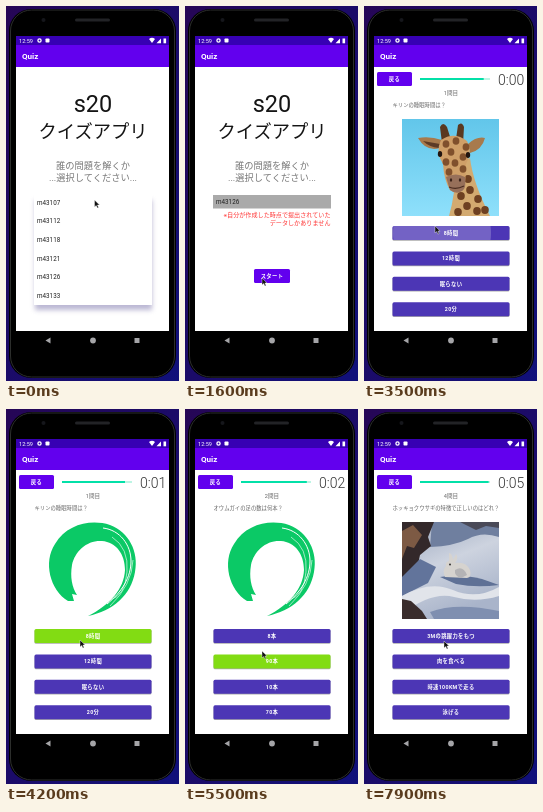
These frames come from a looping animation (173 px wide and 375 px high, 8000 ms). An HTML page:

```html
<!DOCTYPE html>
<html lang="ja">
<head>
<meta charset="utf-8">
<title>Quiz</title>
<style>
html, body { margin: 0; width: 100%; height: 100%; overflow: hidden; background: #140a50; }
svg { display: block; width: 100vw; height: 100vh; }
text { font-family: Roboto, "Noto Sans CJK JP", "Noto Sans CJK", sans-serif; }
.mid { text-anchor: middle; }
.btn { fill: #fff; font-size: 5.3px; font-weight: 700; letter-spacing: .35px; }
</style>
</head>
<body>
<svg id="stage" viewBox="0 0 173 375">
  <defs>
    <filter id="soft" x="-20%" y="-20%" width="140%" height="150%"><feGaussianBlur stdDeviation="2.5"/></filter>
    <clipPath id="screen"><rect x="10" y="61" width="153" height="264"/></clipPath>
    <clipPath id="photo"><rect x="38" y="113" width="97" height="97"/></clipPath>
    <linearGradient id="edge" x2="1" y2="1"><stop stop-color="#260656"/><stop offset="1" stop-color="#10107a"/></linearGradient>
    <linearGradient id="sky" x2="0" y2="1"><stop stop-color="#62c6ea"/><stop offset="1" stop-color="#8fe0fb"/></linearGradient>
    <radialGradient id="sea"><stop stop-color="#0c2860"/><stop offset="1" stop-color="#061336"/></radialGradient>
    <linearGradient id="snow" x2=".4" y2="1"><stop stop-color="#98a5bd"/><stop offset=".5" stop-color="#cdd3df"/><stop offset="1" stop-color="#a9b4ca"/></linearGradient>
  </defs>

  <rect width="173" height="375" fill="url(#edge)"/>
  <rect x="3" y="3" width="167" height="369" rx="22" fill="#000"/>
  <rect x="4.500" y="4" width="164" height="367" rx="21" fill="none" stroke="#2c2e2c"/>
  <rect x="69" y="12.5" width="35" height="3" rx="1.5" fill="#222326"/>
  <circle cx="37.500" cy="14" r="2" fill="#15161b"/>
  <rect x="10" y="30" width="153" height="9" fill="#3700b3"/>
  <rect x="10" y="39" width="153" height="22" fill="#6200ee"/>
  <g fill="#fff">
    <text x="13" y="36.5" font-size="5.6">12:59</text>
    <circle cx="33.5" cy="34.5" r="1.6" fill="none" stroke="#fff" stroke-width="1.3"/>
    <rect x="39.5" y="32.5" width="4" height="4" rx=".8"/>
    <path d="M143 33q3-2.500 6 0l-3 4zM150.500 37.300l4.500-4.800v4.800z"/>
    <rect x="157.500" y="32.500" width="2.600" height="4.800"/>
    <text x="16" y="53" font-size="8.100" font-weight="700">Quiz</text>
  </g>
  <rect x="10" y="61" width="153" height="264" fill="#fff"/>
  <g id="pages" clip-path="url(#screen)"></g>
  <g fill="#a5a5a8">
    <path d="M39.500 334.500l5-3v6z"/>
    <circle cx="87" cy="334.500" r="2.900"/>
    <rect x="128.500" y="332" width="5" height="5"/>
  </g>
  <path id="cursor" d="M0 0v7l1.700-1.500 1.200 2.600 1.200-.6-1.200-2.500h2.200z" fill="#111" stroke="#fff" stroke-width=".4"/>
</svg>
<script>
const LOOP = 8000, STEP = 100;
const $ = id => document.getElementById(id);
const show = (el, on) => el.style.display = on ? '' : 'none';
const clamp = v => Math.max(0, Math.min(1, v));

const label = (x, y, size, fill, s, extra = '') =>
  `<text x="${x}" y="${y}" font-size="${size}" fill="${fill}" ${extra}>${s}</text>`;
const box = (x, y, w, h, fill, extra = '') =>
  `<rect x="${x}" y="${y}" width="${w}" height="${h}" fill="${fill}" ${extra}/>`;
const shape = (d, fill) => `<path d="${d}" fill="${fill}"/>`;
const line = (d, color, w) => `<path d="${d}" fill="none" stroke="${color}" stroke-width="${w}"/>`;
const oval = (x, y, rx, ry, fill) => `<ellipse cx="${x}" cy="${y}" rx="${rx}" ry="${ry}" fill="${fill}"/>`;
const mid = 'class="mid"';

const users = ['m43107', 'm43112', 'm43118', 'm43121', 'm43126', 'm43133'];
const chosen = users[4];

const home = `<g id="home">
  ${label(87, 106, 23.500, '#151515', 's20', mid)}
  ${label(87, 132, 18.300, '#151515', 'クイズアプリ', mid)}
  ${label(87, 163, 9.250, '#777', '誰の問題を解くか', mid)}
  ${label(87, 175, 9.250, '#777', '...選択してください...', mid)}
  ${box(28, 189, 118, 13.500, '#aaa')}
  ${label(31, 198, 6.300, '#222', chosen)}
  ${label(145.500, 210.500, 6.100, '#f33', '※自分が作成した時点で提出されていた', 'text-anchor="end"')}
  ${label(145.500, 218.500, 6.100, '#f33', 'データしかありません', 'text-anchor="end"')}
  ${box(69, 263, 36, 14, '#6200ee', 'rx="1.500"')}
  ${label(87, 272, 5.300, '#fff', 'スタート', 'class="mid btn"')}
  <g id="popup">
    ${box(29, 194, 117, 110, '#7770a8', 'opacity=".5" filter="url(#soft)"')}
    ${box(28, 188, 118, 111, '#fff')}
    <rect id="picked" x="28" y="261" width="118" height="19" fill="#ddd"/>
    ${users.map((u, i) => label(31, 198.500 + i * 18.700, 6.300, '#222', u)).join('')}
  </g>
</g>`;

// Animal pictures, in flat shapes
const giraffe = () => {
  const spots = [[97, 190], [106, 184], [114, 193], [103, 200], [113, 205], [94, 206], [121, 204], [104, 173]];
  const marks = [[82, 138], [92, 135], [102, 141], [87, 146], [99, 151], [82, 156], [91, 157], [99, 163], [85, 166]];
  return box(38, 113, 97, 97, 'url(#sky)') +
    shape('M92 160L106 152Q109 177 126 210H85Q91 190 92 160z', '#d3aa70') +
    spots.map(([x, y]) => oval(x, y, 3.800, 4, '#6e4021')).join('') +
    shape('M76 142Q62 146 54 132Q66 130 78 134zM104 138Q113 130 121 132Q118 144 106 147z', '#a87a4c') +
    shape('M75 142Q65 141 59 135L76 138z', '#5d3b26') +
    shape('M78 137L76 121Q79 115 83 121L87 134zM92 133L94 119Q98 115 100 121L99 138z', '#5a3920') +
    shape('M77 134Q90 125 103 135Q109 146 102 158Q102 174 100 182Q94 190 86 184Q80 174 79 158Q71 146 77 134z', '#cf9f68') +
    marks.map(([x, y]) => oval(x, y, 3.400, 3.800, '#80502c')).join('') +
    shape('M82 171Q92 166 101 171Q102 180 100 183Q94 190 86 184z', '#97705a') +
    oval(76, 148, 2.200, 3, '#20140f') + oval(104, 149, 2.200, 3, '#20140f') +
    oval(87, 174, 1.200, 1.800, '#3d251c') + oval(96, 174, 1.200, 1.800, '#3d251c') +
    line('M85 181Q92 184 100 180', '#4a2c20', 1.200);
};

const nautilus = () => {
  let s = box(38, 113, 97, 97, 'url(#sea)');
  for (let i = 0; i < 11; i++) {
    const x = 28 + i * 11, y = 116 + i * 37 % 82;
    s += line(`M${x} ${y}q9 3 13 14t15 13`, i % 2 ? '#153a75' : '#040e29', 1.200);
  }
  s += shape('M73 158Q67 146 79 140Q93 135 103 145Q111 158 102 168Q91 176 80 169z', '#efe8db');
  for (let i = 0; i < 9; i++) {
    const a = -2.600 + i * .48, c = Math.cos(a), d = Math.sin(a);
    s += line(`M${90 + 6 * c} ${156 + 5 * d}Q${91 + 11 * c} ${152 + 11 * d} ${90 + 15 * c} ${155 + 15 * d}`, '#b8753f', 2);
  }
  s += oval(89, 157, 5, 4.500, '#e9dfcb') + oval(79, 160, 2.500, 2.500, '#3c3030');
  for (let i = 0; i < 7; i++)
    s += line(`M78 ${159 + i}Q72 ${158 + i * 2} ${66 + i * 2.200} ${160 + i * 2.500}`, '#e7d9c0', .9);
  return s;
};

const hare = () => box(38, 113, 97, 97, 'url(#snow)') +
  shape('M68 113H135V128Q118 122 104 130Q90 137 66 138z', '#6f7f9f') +
  shape('M96 113H135V119L122 117L112 121z', '#4a4a58') +
  shape('M38 113H70L64 128L67 137L56 146L53 160L44 168L38 170z', '#33282a') +
  shape('M38 122L49 116L58 126L50 139L43 137L38 150z', '#7d5a44') +
  shape('M38 168L56 150L72 158L64 174L38 187z', '#62749b') +
  shape('M38 187Q66 171 89 181T135 178V187Q112 194 90 188T38 205z', '#e1e4ea') +
  shape('M76 168Q95 164 118 170L135 176Q112 179 92 175z', '#5f7196') +
  shape('M38 190L47 192L58 202L63 210H38z', '#3a2d2c') +
  shape('M66 203Q92 193 135 202V210H70z', '#7f8fb0') +
  shape('M81 168Q78 161 82 157Q81 153 85 152L85 144Q88 144 89 151L92 145Q95 149 91 154Q102 152 106 161Q108 168 103 169z', '#d6d3cf') +
  shape('M91 161Q99 156 103 166L97 169Q90 167 91 161z', '#b4b3b5') +
  oval(86, 155.500, .9, .9, '#222');

// Brush ring for a right answer
const ring = shape('M62 192C44 181 37 153 49 135C61 115 85 110 104 116C123 123 133 143 129 163C125 186 107 202 82 207C104 196 118 180 119 161C119 145 110 133 96 132C81 131 69 142 66 156C64 168 66 178 71 186L66 185L68 192z', '#0bc966') +
  line('M97 119C114 121 125 136 125 152S116 183 101 195', '#fff', 1) +
  line('M106 128Q123 139 121 163T104 191', '#fff', .6) +
  line('M127 151Q126 176 104 197', '#fff', .6);

const quizzes = [
  { start: 2600, press: 3300, right: 3600, end: 4600, pick: 0, rx: 78, art: giraffe(),
    ask: ['キリンの睡眠時間は？'], options: ['8時間', '12時間', '眠らない', '20分'] },
  { start: 4600, press: 5000, right: 5200, end: 6100, pick: 1, rx: 80, art: nautilus(),
    ask: ['オウムガイの足の数は何本？'], options: ['8本', '90本', '10本', '70本'] },
  { start: 6100, press: 6600, right: 6700, end: 7700, pick: 0, rx: 84, art: oval(86, 161, 34, 25, '#8a6848'),
    ask: ['オスのカピバラにだけある「モリージョ」は体の', 'どの部分？'], options: ['鼻の上', '目の外側', '額', '胸'] },
  { start: 7700, press: 9e3, right: 9e3, end: 9e3, pick: 0, rx: 80, art: hare(),
    ask: ['ホッキョクウサギの特徴で正しいのはどれ？'], options: ['3Mの跳躍力をもつ', '肉を食べる', '時速100KMで走る', '泳げる'] }
];

const quizPage = (q, n) => {
  const two = q.ask.length > 1, drop = two ? 7 : 0;
  const top = two ? 226 : 220, gap = two ? 23.900 : 25.400;
  const py = top + q.pick * gap;
  const buttons = q.options.map((o, i) => {
    const y = top + i * gap;
    const base = box(28.500, y + .8, 117, 14, '#aaa', 'rx="1.500"') +
      box(28.500, y, 117, 14, '#4c36b5', `rx="1.500" ${i === q.pick ? `id="hit${n}"` : ''}`);
    const wave = i === q.pick
      ? `<clipPath id="clip${n}"><rect x="28.500" y="${py}" width="117" height="14" rx="1.500"/></clipPath>
         <circle id="wave${n}" cx="${q.rx}" cy="${py + 7}" fill="#fff" clip-path="url(#clip${n})"/>` : '';
    return base + wave + label(87, y + 9, 5.300, '#fff', o, 'class="mid btn"');
  }).join('');
  return `<g id="quiz${n}">
    ${label(87, 89, 5.600, '#666', n + 1 + '問目', mid)}
    ${q.ask.map((s, i) => label(28.500, 101 + i * 8 - (two ? .5 : 0), 5.350, '#666', s)).join('')}
    <g transform="translate(0 ${drop})">
      <g id="art${n}" clip-path="url(#photo)">${q.art}</g>
      <g id="ring${n}">${ring}</g>
    </g>${buttons}</g>`;
};

$('pages').innerHTML = home + `<g id="quiz">
  ${box(13, 66, 35, 14, '#6200ee', 'rx="1.500"')}
  ${label(30.500, 75.200, 5.500, '#fff', '戻る', 'class="mid btn"')}
  ${box(56, 72, 70, 2, '#bdf5e4')}
  <rect id="bar" x="56" y="72" height="2" fill="#03e0a8"/>
  <text id="clock" x="134" y="79" font-size="14" font-weight="300" fill="#333"></text>
  ${quizzes.map(quizPage).join('')}</g>`;

// time, x, y of the pointer tip
const path = [[0, 88.500, 194], [300, 88, 197], [800, 71, 269], [1000, 71, 269], [1500, 77, 272], [2500, 77, 272],
  [3200, 71, 220], [3700, 71, 220], [4700, 77, 242], [5700, 77, 242], [6500, 79.500, 232], [8000, 80, 232]];

function pointer(t) {
  const i = path.findIndex(p => p[0] > t);
  const [a, b] = [path[i - 1], path[i]];
  let k = (t - a[0]) / (b[0] - a[0]);
  k = k * k * (3 - 2 * k);
  return [1, 2].map(j => a[j] + (b[j] - a[j]) * k);
}

function draw(t) {
  const opened = t >= 2600;
  show($('home'), !opened);
  show($('quiz'), opened);
  show($('popup'), t < 1100);
  show($('picked'), t >= 800);
  $('popup').setAttribute('opacity', 1 - clamp((t - 900) / 200));
  $('clock').textContent = '0:0' + Math.max(0, Math.floor((t - 2700) / 1000));

  quizzes.forEach((q, n) => {
    const active = t >= q.start && t < q.end, right = t >= q.right;
    show($('quiz' + n), active);
    if (!active) return;
    show($('art' + n), !right);
    show($('ring' + n), right);
    $('hit' + n).setAttribute('fill', right ? '#82dc13' : '#4c36b5');
    const age = t - q.press, wave = $('wave' + n);
    wave.setAttribute('r', age < 0 ? 0 : 49 * Math.min(1, Math.sqrt(age / 200)));
    wave.setAttribute('opacity', age < 0 ? 0 : .22 * clamp((500 - age) / 200));
    $('bar').setAttribute('width', 70 * (1 - (Math.min(t, q.right) - q.start) / 10000));
  });
  $('cursor').setAttribute('transform', `translate(${pointer(t)})`);
}

const began = performance.now();
function tick() {
  const t = (performance.now() - began) % LOOP;
  draw(Math.floor(t / STEP) * STEP);
  requestAnimationFrame(tick);
}
tick();
</script>
</body>
</html>
```
